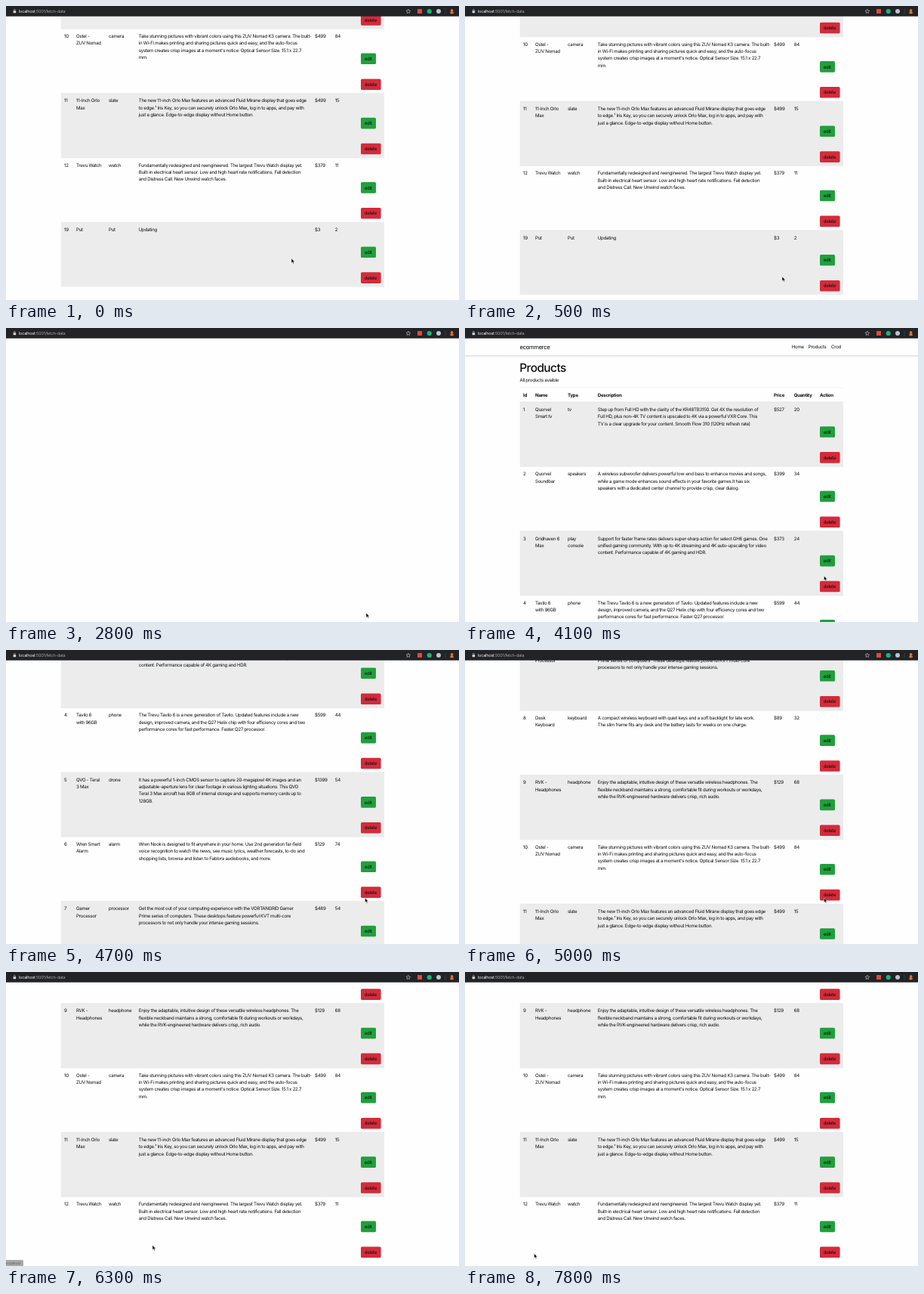
Write an HTML page that moves like this. It is 600 by 389 pixels and loops after 7.9 s.

```html
<!DOCTYPE html>
<html lang="en">
<head>
<meta charset="utf-8">
<title>Products</title>
<style>
  html, body { margin: 0; height: 100%; overflow: hidden; background: #fefefe; }
  svg { display: block; width: 600px; height: 389px; }
  text { font: 6.15px Inter, "Open Sans", sans-serif; letter-spacing: -.045em; fill: #0c0d0f; text-rendering: geometricPrecision; }
  .brand { font-size: 7.7px; }
  .title { font-size: 15.4px; font-weight: 500; letter-spacing: -.035em; }
  .head { font-weight: 700; }
  .url { font-size: 5.6px; fill: #a0a3a8; }
  .hint { font-size: 4.9px; fill: #666; }
  .edit { fill: #20a03c; }
  .delete { fill: #d42b3a; }
  .edit.hover { fill: #1b8d34; }
  .delete.hover { fill: #c52634; }
</style>
</head>
<body>
<svg viewBox="0 0 600 389">
  <defs>
    <linearGradient id="shade" x2="0" y2="1">
      <stop stop-color="#dcdcdc"/><stop offset="1" stop-color="#fefefe"/>
    </linearGradient>
  </defs>
  <rect width="600" height="389" fill="#fefefe"/>
  <g id="page">
    <g id="header">
      <rect y="36" width="600" height="3" fill="url(#shade)"/>
      <text class="brand" x="72.5" y="27.7">ecommerce</text>
      <text x="432.8" y="27.4">Home</text>
      <text x="454.8" y="27.4">Products</text>
      <text x="485" y="27.4">Crod</text>
      <text class="title" x="72.2" y="57.7">Products</text>
      <text x="72.5" y="70.8">All products avaible</text>
    </g>
    <g id="table"></g>
  </g>
  <g id="status">
    <path id="tab" fill="#a8a8a8"/>
    <text id="hint" class="hint" x="0" y="387"></text>
  </g>
  <g id="toolbar">
    <rect width="600" height="13.7" fill="#222327"/>
    <rect x="9.6" y="6.2" width="3.6" height="3" rx=".4" fill="#d5d7da"/>
    <path d="M10.4 6.3V5.4a1 1 0 0 1 2 0V6.3" fill="none" stroke="#d5d7da" stroke-width=".6"/>
    <text class="url" x="17" y="9"><tspan fill="#f1f2f4">localhost</tspan>:5001/fetch-data</text>
    <path d="M532.8 4.2l.8 1.8 2 .2-1.5 1.3.4 2-1.7-1-1.7 1 .4-2-1.5-1.3 2-.2z" fill="none" stroke="#c9cbce" stroke-width=".6"/>
    <rect x="545" y="4" width="6" height="6" fill="#e2483d"/>
    <circle cx="560.7" cy="7" r="3.1" fill="#16b67c"/>
    <circle cx="573" cy="7" r="3" fill="#b9c6d0"/>
    <path d="M582 3.5v7" stroke="#55575c" stroke-width=".5"/>
    <circle cx="590.5" cy="7" r="3.6" fill="#3a2418"/>
    <path d="M588 9.6q.3-2 1.6-2.2a1.8 1.8 0 1 1 2 0q1.2.3 1.5 2.2-2.5 1.6-5.1 0Z" fill="#cf7a3e"/>
  </g>
  <g id="cursor">
    <path id="arrow" d="M0 0V6l1.4-1.3 1 2.2 1-.4-.9-2.1H4.3Z" fill="#000" stroke="#fff" stroke-width=".45"/>
    <path id="hand" d="M1 .6q.7-.5 1 .3l.4 1.6 2.3.5q.9.3.8 1.3l-.4 2.3H2L.1 4.2q.1-.8 1.2-.1Z" fill="#fff" stroke="#111" stroke-width=".55"/>
  </g>
</svg>
<script>
const LOOP = 7900, STEP = 100, ROW = 85.3, TABLE = 98, LINE = 9.3;
const COLUMNS = [77, 93, 136, 175.8, 409, 435.8, 470];
const HEADINGS = ['Id', 'Name', 'Type', 'Description', 'Price', 'Quantity', 'Action'];
// A vertical bar marks a line break inside a cell.
const PRODUCTS = [
  [1, 'Quorvel|Smart tv', 'tv', 'Step up from Full HD with the clarity of the KR48TB3150. Get 4X the resolution of|Full HD, plus non-4K TV content is upscaled to 4K via a powerful VXR Core. This|TV is a clear upgrade for your content. Smooth Flow 310 (120Hz refresh rate)', '$527', 20],
  [2, 'Quorvel|Soundbar', 'speakers', 'A wireless subwoofer delivers powerful low-end bass to enhance movies and songs,|while a game mode enhances sound effects in your favorite games.It has six|speakers with a dedicated center channel to provide crisp, clear dialog.', '$399', 34],
  [3, 'Gridhaven 6|Max', 'play|console', 'Support for faster frame rates delivers super-sharp action for select GH6 games. One|unified gaming community. With up to 4K streaming and 4K auto-upscaling for video|content. Performance capable of 4K gaming and HDR.', '$373', 24],
  [4, 'Tavilo 6|with 96GB', 'phone', 'The Trevu Tavilo 6 is a new generation of Tavilo. Updated features include a new|design, improved camera, and the Q27 Helix chip with four efficiency cores and two|performance cores for fast performance. Faster Q27 processor.', '$599', 44],
  [5, 'QVO - Teral|3 Max', 'drone', 'It has a powerful 1-inch CMOS sensor to capture 20-megapixel 4K images and an|adjustable-aperture lens for clear footage in various lighting situations. This QVO|Teral 3 Max aircraft has 8GB of internal storage and supports memory cards up to|128GB.', '$1399', 54],
  [6, 'Wren Smart|Alarm', 'alarm', 'Wren Nook is designed to fit anywhere in your home. Use 2nd generation far-field|voice recognition to watch the news, see music lyrics, weather forecasts, to-do and|shopping lists, browse and listen to Fablora audiobooks, and more.', '$129', 74],
  [7, 'Gamer|Processor', 'processor', 'Get the most out of your computing experience with the VORTANGRID Gamer|Prime series of computers. These desktops feature powerful KVT multi-core|processors to not only handle your intense gaming sessions.', '$489', 54],
  [8, 'Desk|Keyboard', 'keyboard', 'A compact wireless keyboard with quiet keys and a soft backlight for late work.|The slim frame fits any desk and the battery lasts for weeks on one charge.', '$89', 32],
  [9, 'RVK -|Headphones', 'headphone', 'Enjoy the adaptable, intuitive design of these versatile wireless headphones. The|flexible neckband maintains a strong, comfortable fit during workouts or workdays,|while the RVK-engineered hardware delivers crisp, rich audio.', '$129', 68],
  [10, 'Ostel -|ZUV Nomad', 'camera', 'Take stunning pictures with vibrant colors using this ZUV Nomad K3 camera. The built-|in Wi-Fi makes printing and sharing pictures quick and easy, and the auto-focus|system creates crisp images at a moment\'s notice. Optical Sensor Size. 15.1 x 22.7|mm.', '$499', 84],
  [11, '11-Inch Orlo|Max', 'slate', 'The new 11-inch Orlo Max features an advanced Fluid Mirane display that goes edge|to edge.¹ Iris Key, so you can securely unlock Orlo Max, log in to apps, and pay with|just a glance. Edge-to-edge display without Home button.', '$499', 15],
  [12, 'Trevu Watch', 'watch', 'Fundamentally redesigned and reengineered. The largest Trevu Watch display yet.|Built-in electrical heart sensor. Low and high heart rate notifications. Fall detection|and Distress Call. New Unwind watch faces.', '$379', 11],
  [19, 'Put', 'Put', 'Updating', '$3', 2],
];

// Keyframes: time, then values; linear in between.
const SCROLL = [[0, 835.4], [100, 832.5], [200, 829.5], [300, 827], [400, 825.4], [600, 824.2], [2900, 824.2],
  [3000, 0], [4200, 0], [4300, 28], [4400, 85], [4500, 143], [4700, 277.3], [4900, 505], [5000, 615],
  [5100, 705], [5200, 750], [5300, 747], [5400, 742.3], [5500, 740], [5600, 738.9]];
const POINTER = [[0, 378, 334], [100, 378, 334], [500, 420, 358], [800, 451, 372], [1200, 477, 377], [3600, 477, 377],
  [4000, 475.5, 328], [5300, 475.5, 328], [5400, 475, 329], [5600, 475, 329], [6000, 260, 352],
  [6200, 194, 361.5], [6800, 194, 361.5], [7200, 120, 356], [7600, 89, 359], [7700, 91, 366], [7800, 91.5, 372.5]];

const $ = id => document.getElementById(id);
const show = (id, on) => $(id).style.display = on ? '' : 'none';
const within = (t, from, to) => t >= from && t < to;

const label = (x, y, value, cls = '') => String(value).split('|')
  .map((line, i) => `<text class="${cls}" x="${x}" y="${y + i * LINE}">${line}</text>`).join('');

const button = (name, id, y, width) =>
  `<rect id="${name}${id}" class="${name}" x="470" y="${y}" width="${width}" height="14.6" rx="1.6"/>` +
  label(474.7, y + 9.5, name);

const rule = (y, weight) => `<path d="M72.8 ${y}H501" stroke="#dcdfe2" stroke-width="${weight}"/>`;

function row(cells, i) {
  const top = TABLE + i * ROW, id = cells[0];
  return `<g id="row${id}">` +
    (i % 2 ? '' : `<rect x="72.8" y="${top}" width="428.2" height="${ROW}" fill="#ececec"/>`) +
    rule(top, i ? .4 : .8) +
    cells.map((cell, c) => label(COLUMNS[c], top + 11.9, cell)).join('') +
    button('edit', id, top + 32.2, 20) + button('delete', id, top + 66.1, 26.6) + '</g>';
}

function valueAt(keys, t) {
  const next = keys.findIndex(key => key[0] > t);
  if (next < 0) return keys[keys.length - 1].slice(1);
  const a = keys[next - 1], b = keys[next], k = (t - a[0]) / (b[0] - a[0]);
  return a.slice(1).map((v, i) => v + (b[i + 1] - v) * k);
}

function setStatus(t) {
  const leaving = within(t, 1700, 2800), hovering = within(t, 5500, 6500);
  const width = leaving ? 37 : 23;
  show('status', leaving || hovering);
  $('tab').setAttribute('d', `M0 381H${width - 1.5}q1.5 0 1.5 1.5V389H0Z`);
  $('hint').textContent = leaving ? 'localhost:5001' : 'localhost';
}

function draw() {
  const t = Math.floor(performance.now() % LOOP / STEP) * STEP;
  const onDelete = within(t, 1200, 2000), onEdit = within(t, 5300, 5700);
  $('page').setAttribute('transform', `translate(0 ${-valueAt(SCROLL, t)[0]})`);
  $('cursor').setAttribute('transform', `translate(${valueAt(POINTER, t)})`);
  show('page', !within(t, 2000, 3100));
  show('table', !within(t, 2000, 3400));
  show('row19', t < 2000);
  show('hand', onDelete || onEdit);
  show('arrow', !onDelete && !onEdit);
  $('delete19').classList.toggle('hover', onDelete);
  $('edit12').classList.toggle('hover', onEdit);
  setStatus(t);
  requestAnimationFrame(draw);
}

$('table').innerHTML = rule(79, .4) +
  HEADINGS.map((name, i) => label(COLUMNS[i], 90.7, name, 'head')).join('') +
  PRODUCTS.map(row).join('');
draw();
</script>
</body>
</html>
```
